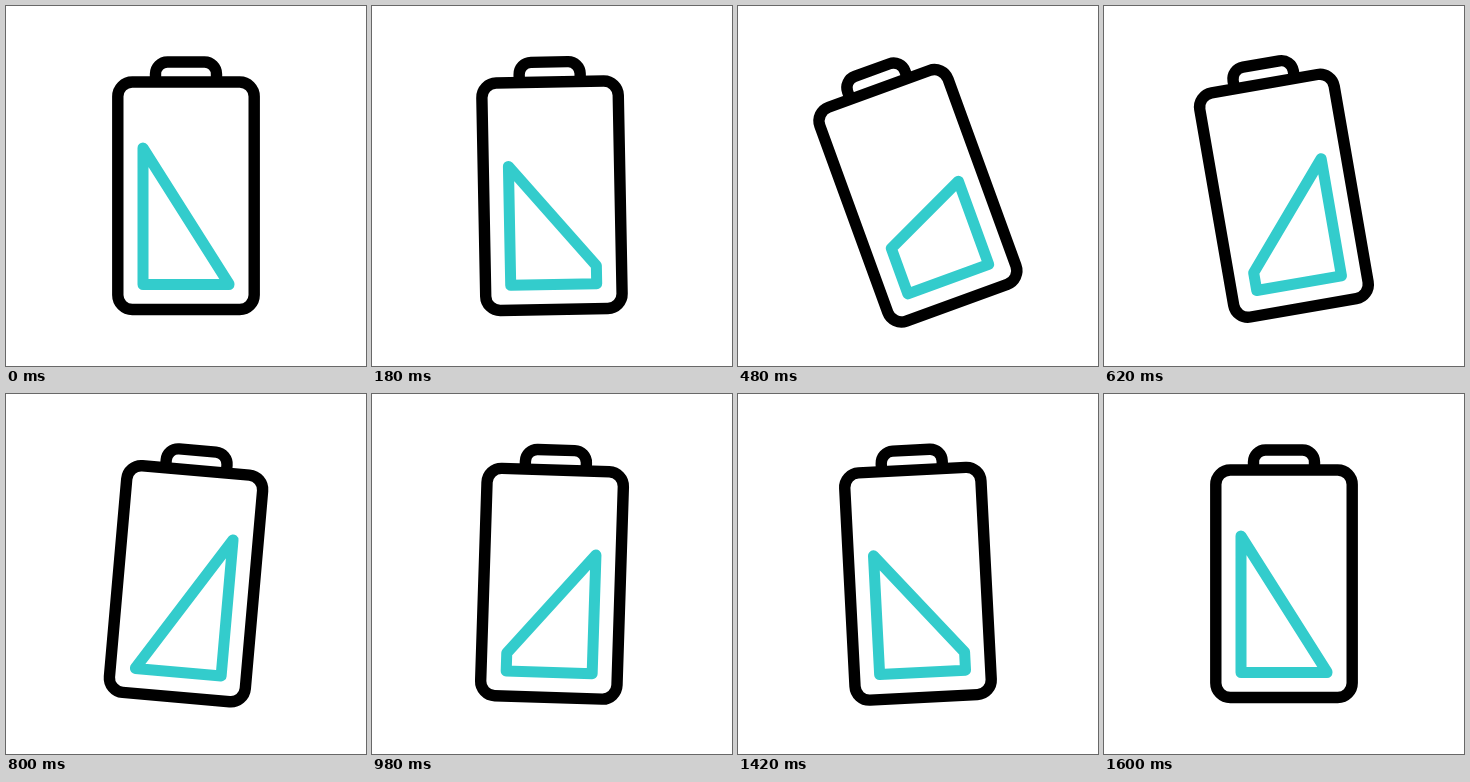
An HTML page that plays this animation: 360x360 px, repeating every 1620 ms.

```html
<!DOCTYPE html>
<html lang="en">
<head>
<meta charset="utf-8">
<title>Battery</title>
<style>
  html, body { margin: 0; width: 100%; height: 100%; overflow: hidden; background: #fff; }
  svg { display: block; width: 100vw; height: 100vh; }
</style>
</head>
<body>
<svg viewBox="0 0 360 360">
  <g id="battery" fill="none" stroke="#000" stroke-width="11.4" stroke-linejoin="round">
    <path d="M149.5 76V68a12 12 0 0 1 12-12h37a12 12 0 0 1 12 12v8"/>
    <rect x="111.8" y="76" width="136.4" height="227.5" rx="14.5"/>
    <path id="liquid" stroke="#3cc" stroke-width="11"/>
  </g>
</svg>
<script>
  const LOOP = 1620, STEP = 20, SWEEP = 800;
  const battery = document.getElementById('battery');
  const liquid = document.getElementById('liquid');

  // [time in ms, angle in degrees]
  const swing = [[0, 0], [130, 0], [480, -20], [800, 5], [1280, -5], [1600, 0]];

  const ease = u => u * u * (3 - 2 * u);

  function angleAt(t) {
    const i = swing.findIndex(([time]) => time > t);
    if (i < 0) return 0;
    const [t0, a0] = swing[i - 1], [t1, a1] = swing[i];
    return a0 + (a1 - a0) * ease((t - t0) / (t1 - t0));
  }

  // The surface tips fully to one side and back around a constant mean level.
  function tiltAt(t) {
    const u = t / SWEEP;
    return 68 * (1 - 2 * ease(u < 1 ? u : 2 - u));
  }

  function draw(now) {
    const t = Math.min(Math.floor(now % LOOP / STEP) * STEP, 2 * SWEEP);
    const tilt = tiltAt(t);
    battery.setAttribute('transform', `rotate(${angleAt(t)} 180 190)`);
    liquid.setAttribute('d', `M137 ${210 - tilt}L223 ${210 + tilt}V278.5H137Z`);
  }

  const start = performance.now();
  function frame() {
    draw(performance.now() - start);
    requestAnimationFrame(frame);
  }
  frame();
</script>
</body>
</html>
```
